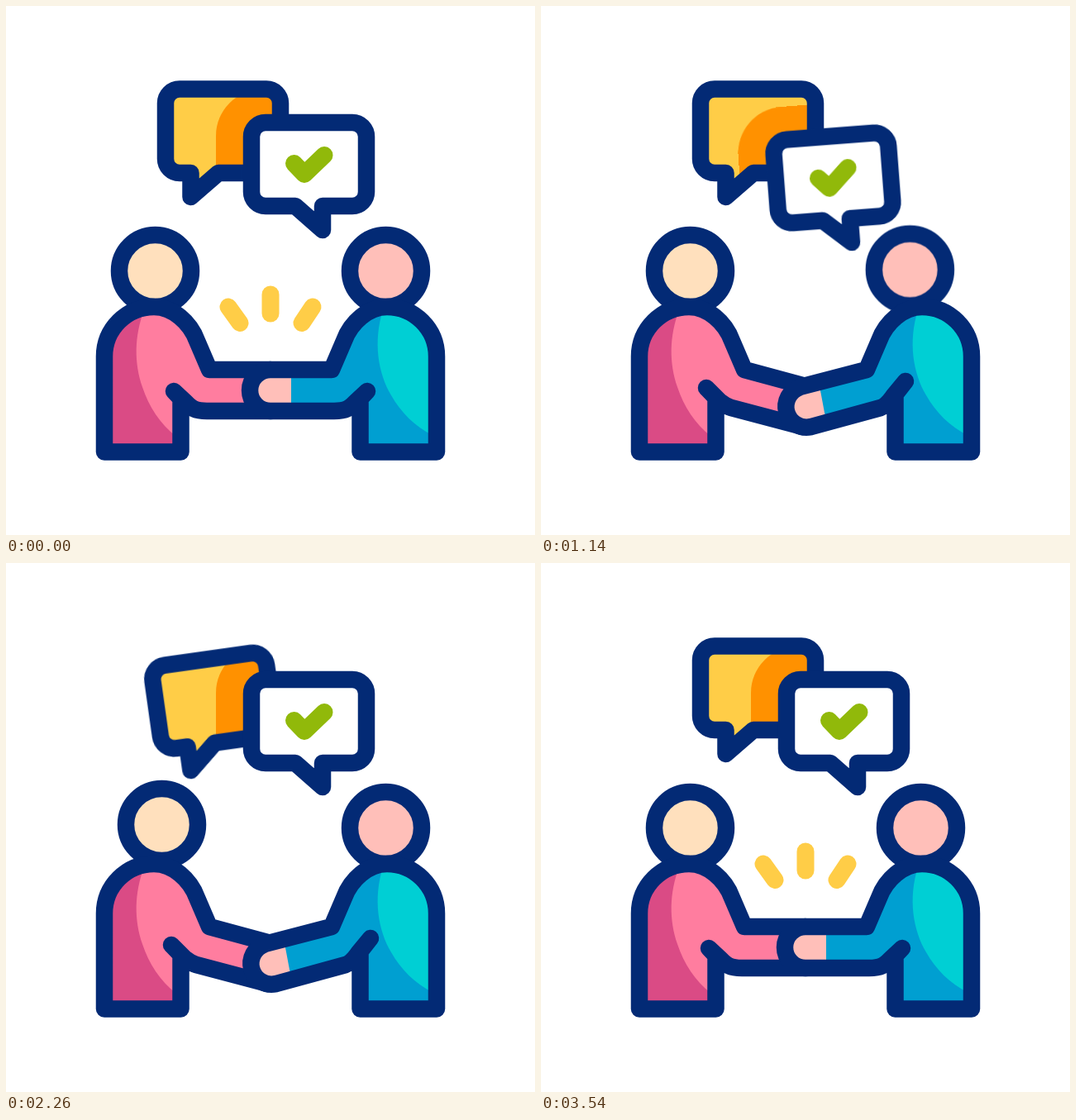
An HTML page without scripts that plays this animation: 640x640 px, repeating every 3600 ms.

```html
<!DOCTYPE html>
<html lang="en">
<head>
<meta charset="utf-8">
<title>Handshake</title>
<style>
  html, body { margin: 0; width: 100%; height: 100%; overflow: hidden; background: #fff; }
  svg { display: block; width: 100%; height: 100%; }

  .line { fill: none; stroke: #032a75; stroke-width: 20.5; stroke-linecap: round; stroke-linejoin: round; }
  .head { stroke: #032a75; stroke-width: 20.5; }
  .ray { fill: none; stroke: #ffcd47; stroke-width: 21; stroke-linecap: round; stroke-dasharray: 100 140; }
  .check { fill: none; stroke: #91b90a; stroke-width: 21; stroke-linecap: round; stroke-linejoin: round; }

  .bubble-l, .bubble-r, .head-l, .head-r, .body-l, .body-r, .hand, .ray {
    animation: 3600ms cubic-bezier(.35, 0, .65, 1) infinite;
  }
  .bubble-l { animation-name: bubble-l; transform-origin: 223.5px 231px; }
  .bubble-r { animation-name: bubble-r; transform-origin: 383px 271px; }
  .head-l { animation-name: head-l; }
  .head-r { animation-name: head-r; }
  .body-l { animation-name: body-l; }
  .body-r { animation-name: body-r; }
  .hand { animation-name: hand; }
  .ray { animation-name: ray; }

  .shape-l {
    d: path("M210 100.5H315A17 17 0 0 1 332 117.5V185A17 17 0 0 1 315 202H257L223.5 231V202H210A17 17 0 0 1 193 185V117.5A17 17 0 0 1 210 100.5Z");
  }

  /* The right one talks first, then the left one. */
  @keyframes bubble-r {
    0%, 54.4%, 100% { transform: none; }
    11.94%, 28.22%, 44.5% { transform: translate(-7px, 15px) rotate(-12.2deg); }
    20.08%, 36.36% { transform: translate(-7px, 15px) rotate(8deg); }
  }
  @keyframes head-r {
    0%, 54.4%, 100% { transform: none; }
    11.3%, 27.6%, 43.9% { transform: translate(-18.2px, .6px); }
    19.4%, 35.7% { transform: translate(-8.3px, -3.5px); }
  }
  @keyframes bubble-l {
    0%, 44.2%, 97.8%, 100% { transform: none; }
    54.75%, 71.03%, 87.3% { transform: translate(0, 20px) rotate(12.2deg); }
    62.9%, 79.17% { transform: translate(0, 20px) rotate(-8deg); }
  }
  @keyframes head-l {
    0%, 44.2%, 97.8%, 100% { transform: none; }
    54.75%, 71.03%, 87.3% { transform: translate(18.2px, .6px); }
    62.9%, 79.17% { transform: translate(8px, -4px); }
  }

  @keyframes body-l {
    0%, 98%, 100% { d: path("M119 539.5V424A60 60 0 0 1 179 364C202 364 223 383 231 405L246 440L320 440L320 490L243 490C228 490 224 486 218 480L203 466L211.5 475V539.5Z"); }
    9.5%, 88.5% { d: path("M119 539.5V424A60 60 0 0 1 179 364C202 364 223 383 231 405L246 440L320 460L317 509L230 486C223 484 221 482 216 478L200 462L211.5 474V539.5Z"); }
  }
  @keyframes body-r {
    0%, 98%, 100% { d: path("M521 539.5V424A60 60 0 0 0 461 364C438 364 417 383 409 405L394 440L320 440A25 25 0 0 0 320 490L397 490C412 490 416 486 422 480L437 466L428.5 475V539.5Z"); }
    9.5%, 88.5% { d: path("M521 539.5V424A60 60 0 0 0 461 364C438 364 417 383 409 405L394 440L313.5 460.9A25 25 0 0 0 326.5 509.1L411 486C419 483 423 476 427 471L441 454L428.5 470V539.5Z"); }
  }
  @keyframes hand {
    0%, 98%, 100% { d: path("M320 440A25 25 0 0 0 320 490L345 490L345 440Z"); }
    9.5%, 88.5% { d: path("M313.5 460.9A25 25 0 0 0 326.5 509.1L345.5 505L336 455Z"); }
  }
  @keyframes ray {
    0%, 98%, 100% { stroke-dashoffset: 0; }
    8%, 90% { stroke-dashoffset: 115; }
  }
</style>
</head>
<body>
<svg viewBox="0 0 640 640">
  <clipPath id="bubble"><path class="shape-l bubble-l"/></clipPath>

  <path class="shape-l bubble-l" fill="#ffcd47"/>
  <g clip-path="url(#bubble)">
    <path class="bubble-r" fill="#ff9100" d="M254 290V157A56 56 0 0 1 310 101H460V290Z"/>
  </g>
  <path class="shape-l bubble-l line"/>

  <g class="bubble-r">
    <path class="line" style="fill:#fff" d="M314 141H419A17 17 0 0 1 436 158V225A17 17 0 0 1 419 242H383V271L350 242H314A17 17 0 0 1 297 225V158A17 17 0 0 1 314 141Z"/>
    <path class="check" d="M348.5 190.5L361 203.5L385 180.5"/>
  </g>

  <path class="ray" pathLength="100" d="M283 383.5L269 364"/>
  <path class="ray" pathLength="100" d="M320 372V349"/>
  <path class="ray" pathLength="100" d="M358 383.5L371 364"/>

  <circle class="head head-l" cx="180.5" cy="320.5" r="43.5" fill="#ffe0bd"/>
  <circle class="head head-r" cx="459.5" cy="320.5" r="43.5" fill="#ffbfb9"/>

  <path class="body-l" fill="#ff7d9f"/>
  <path fill="#da4b85" d="M167 368C155 400 155 432 165 461C173 485 186 505 206 521V535H119V424A60 60 0 0 1 167 368Z"/>
  <path class="body-l line"/>

  <path class="body-r" fill="#009fd1"/>
  <path class="hand" fill="#ffbfb9"/>
  <path fill="#00cfd4" d="M456 368C444 406 450 444 466 471C478 492 494 508 517 520L521 424A60 60 0 0 0 456 368Z"/>
  <path class="body-r line"/>
</svg>
</body>
</html>
```
